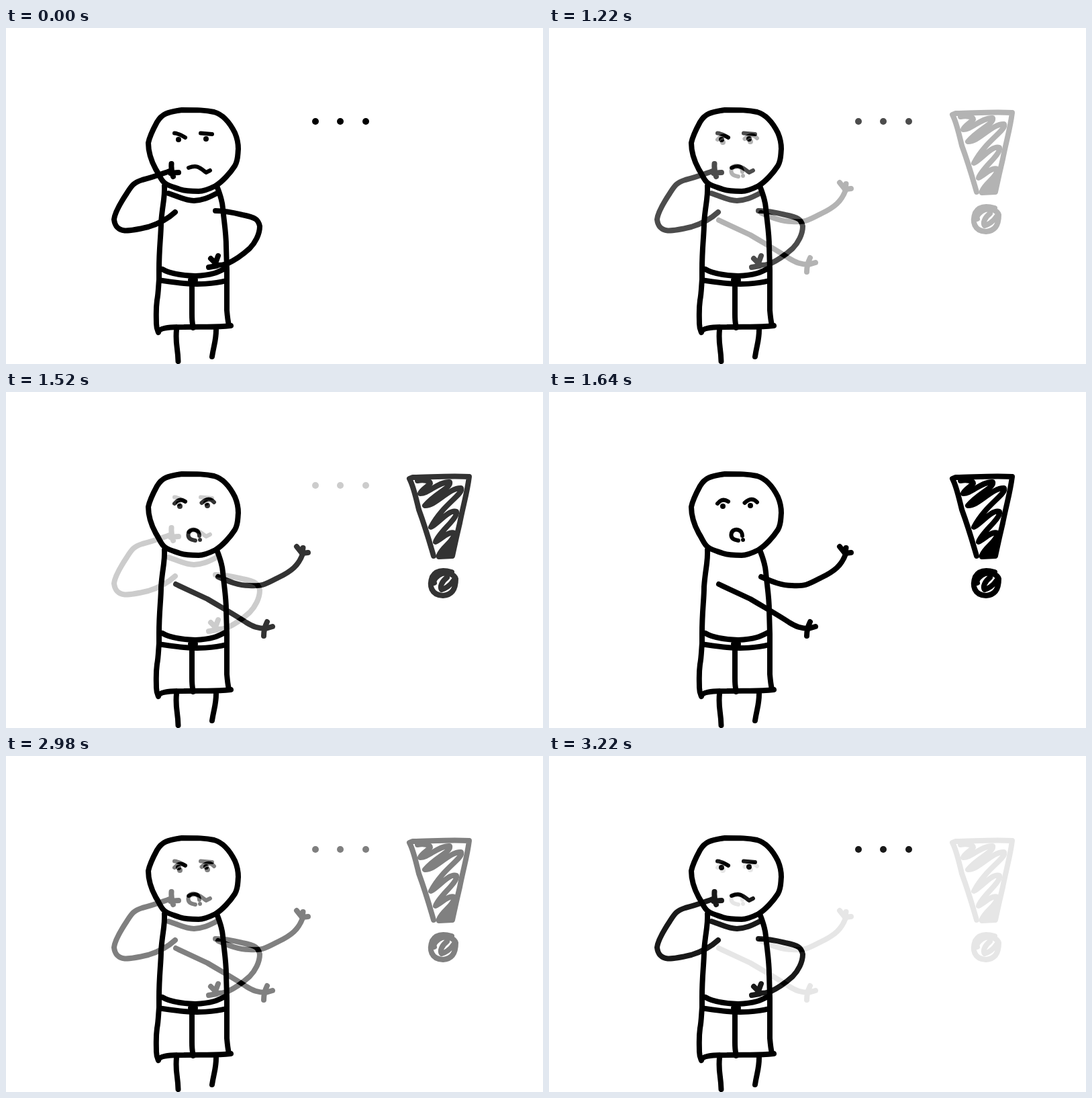
Animation, 800 px wide and 500 px high, one loop 3280 ms. Source, as an HTML page:

```html
<!DOCTYPE html>
<html lang="en">
<head>
<meta charset="utf-8">
<title>Thinking, then idea</title>
<style>
  html, body { margin: 0; width: 100%; height: 100%; overflow: hidden; background: #fff; }
  svg { display: block; width: 800px; height: 500px; }
  .line { fill: none; stroke: #000; stroke-width: 8; stroke-linecap: round; stroke-linejoin: round; }
  .fine { stroke-width: 6; }
  .idea { opacity: 0; animation: dissolve 3280ms infinite; }

  /* each dissolve runs in ten hard steps of 60 ms */
  @keyframes dissolve {
    0% { opacity: 0; animation-timing-function: step-end; }
    31.7% { opacity: 0; animation-timing-function: steps(10, end); }
    50% { opacity: 1; animation-timing-function: step-end; }
    81.7% { opacity: 1; animation-timing-function: steps(10, end); }
    100% { opacity: 0; }
  }
</style>
</head>
<body>
<svg viewBox="0 0 800 500">
  <defs>
    <g id="body" class="line">
      <!-- head -->
      <path d="M237 231C231 227 230 221 223 210C217 199 212 185 212 171C214 161 219 151 225 140C232 128 240 125 262 122C285 122 297 122 310 125C324 129 333 140 341 156C344 163 346 172 346 180C345 190 346 196 341 205C334 216 322 229 312 235C302 240 295 243 287 243C275 243 265 242 259 240C251 237 242 235 237 231Z"/>
      <!-- sides and shorts -->
      <path d="M236 235C237 253 233 262 231 290C231 310 228 325 228 360V374C227 385 227 395 225 405C223 420 224 430 224 440C224 446 225 448 227 453C228 447 240 445 265 445C300 444 310 446 335 443"/>
      <path d="M314 235C318 245 322 255 323 268C325 290 328 305 328 325L329 360V420C330 432 331 438 332 442"/>
      <path d="M233 359C243 365 258 368 282 369C306 368 315 364 328 357"/>
      <path d="M230 375.500C240 377 255 379 265 380C285 382 310 381 328 376"/>
      <path d="M275 375H282M277 382V425C277 440 278 440 279 446"/>
      <!-- legs -->
      <path d="M254 449C252 470 256 475 256.500 496M313 449C313 465 310 470 307 489"/>
    </g>
  </defs>

  <g class="thinking">
    <use href="#body"/>
    <g class="line">
      <path d="M242 246C260 252 268 257 280 257C295 256 302 252 314 246"/>
      <path d="M252 274C240 285 225 292 212 296C195 300 185 302 177 301.500C165 300 162 293 161 285C162 275 172 258 180 246C187 235 190 230 203 226C220 222 232 217 244 213"/>
      <path d="M246.500 202C246 210 247 216 249 221M245 216L257 215"/>
      <path d="M312 272C325 272 340 275 352 278C372 282 376 285 378 295C378 307 371 320 363 328C352 338 340 346 329 351C322 353 318 353 313 353"/>
      <path d="M302 356L314 354M305 343L312 350L316 339"/>
      <path class="fine" d="M251 156.500Q258 157 267 163M290 156.500L307 158M272 208C285 203 289 208 298 215L304 212"/>
    </g>
    <circle cx="257" cy="166" r="4"/>
    <circle cx="298" cy="165" r="4"/>
    <circle cx="461" cy="139" r="5"/>
    <circle cx="498" cy="139" r="5"/>
    <circle cx="536" cy="139" r="5"/>
  </g>

  <g class="idea">
    <rect width="800" height="500" fill="#fff"/>
    <use href="#body"/>
    <g class="line">
      <path d="M316 275C330 281 345 288 362 288C382 289 385 287 405 276.500C425 267 436 258 442 241"/>
      <path d="M433 230L441 240L450 239M442.500 232L441 240"/>
      <path d="M253 286L300 308C320 320 340 331 358 343C368 349 375 352 387 352L397 349M389 342C385 350 384 355 384 363"/>
      <path class="fine" d="M251 166Q258 157 267 163M291.500 165Q302 155 310 164M282 221C275 220 271 217 271.500 212C272 206 277 204 281 205C286 206 288 210 288 214"/>
      <!-- exclamation mark with scribbled filling -->
      <path d="M637 244C630 220 626 205 615 175C610 155 607 140 601 129L606 127C630 127 660 124 690 126C687 150 682 165 676 195C670 220 668 230 665 244L645 245"/>
      <path d="M613 132C622 130 632 132 632 136C629 140 618 146 617 151C628 152 645 133 661 134C664 142 640 150 624 169C640 170 660 142 678 143C682 152 650 168 633 201C645 195 660 174 671 178C674 188 645 208 640 223C650 218 660 206 668 210C668 222 650 230 645 243L664 242L665 228L654 240"/>
      <path d="M664 268C650 264 640 266 635 275C630 288 633 302 651 303C666 302 670 291 670 278C668 272 660 268 650 270C642 273 636 280 638 284M657 276C649 282 646 290 649 294C654 293 662 288 667 280"/>
    </g>
    <circle cx="259" cy="170" r="4"/>
    <circle cx="300" cy="169" r="4"/>
    <circle cx="289" cy="220" r="3"/>
  </g>
</svg>
</body>
</html>
```
